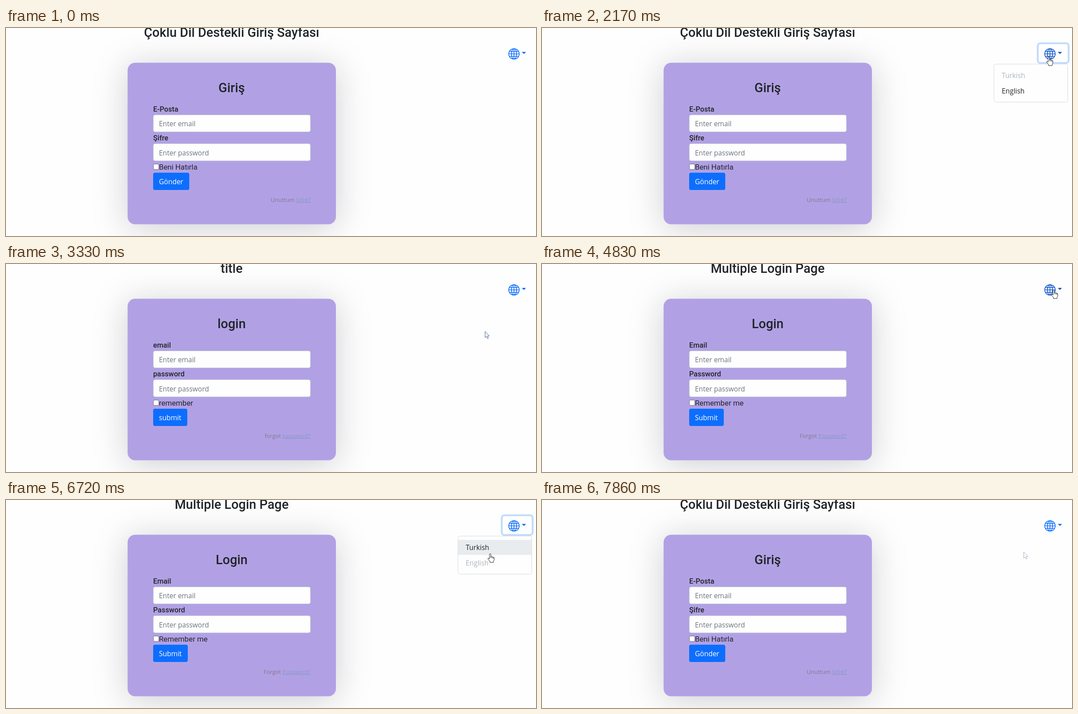
These frames come from a looping animation (1192x470 px, 8 s). An HTML page:

```html
<!DOCTYPE html>
<html lang="en">
<head>
<meta charset="utf-8">
<title>Login page with language menu</title>
<style>
  html, body { margin: 0; width: 100%; height: 100%; overflow: hidden; background: #fefefe; }
  svg { display: block; width: 100%; height: 100%; }
  text { font: 15.5px "Open Sans", "Noto Sans", sans-serif; fill: #212529; }
  .heading { font: 500 28.8px Roboto, sans-serif; text-anchor: middle; }
  .label { font: 500 16.2px Roboto, sans-serif; }
  .plain { font: 16.8px Roboto, sans-serif; }
  .hint { fill: #6c757d; }
  #forgot { font-size: 12.85px; text-anchor: end; fill: #857790; }
  #forgotLink { fill: #8b97c8; text-decoration: underline; }
  #card { filter: drop-shadow(0 8px 38px rgba(8, 11, 33, .2)); }
  .field { fill: #fefefe; stroke: #ced4da; }
</style>
</head>
<body>
<svg viewBox="0 0 1192 470">
  <rect id="card" x="273.5" y="78.5" width="468.5" height="365" rx="17" fill="#b1a1e4"/>
  <text id="title" class="heading" x="507.5" y="20"/>
  <text id="login" class="heading" x="507.5" y="144.5"/>
  <text id="email" class="label" x="331" y="189"/>
  <rect class="field" x="331.5" y="196.5" width="353" height="38" rx="4"/>
  <text class="hint" x="344" y="222">Enter email</text>
  <text id="password" class="label" x="331" y="254"/>
  <rect class="field" x="331.5" y="261.5" width="353" height="38.5" rx="4"/>
  <text class="hint" x="344" y="288">Enter password</text>
  <rect x="331.5" y="307.5" width="12" height="12" rx="2.5" fill="#fff" stroke="#767676"/>
  <text id="remember" class="plain" x="344" y="320"/>
  <rect id="button" x="331" y="327" height="39" rx="4" fill="#0d6efd"/>
  <text id="submit" x="344" y="352.5" style="fill:#fff"/>
  <text id="forgot" x="685" y="392.5"><tspan id="forgotText"/> <tspan id="forgotLink"/></text>

  <rect id="ring" x="1115" y="34.5" width="69.5" height="44.5" rx="6" fill="none" stroke="#c2dbfe" stroke-width="4.2"/>
  <g id="globe" stroke-width="1.6">
    <circle cx="1142.5" cy="58.5" r="11.8" fill="none"/>
    <ellipse cx="1142.5" cy="58.5" rx="5.8" ry="11.8" fill="none"/>
    <path d="M1142.5 46.7v23.6M1130.7 58.5h23.6M1132.5 53h20M1132.5 64h20"/>
    <path d="M1160 54h9.4l-4.7 4.7z" stroke="none"/>
  </g>
  <g id="menu">
    <rect x="1016.5" y="81.5" width="166" height="86" rx="4" fill="#fefefe" stroke="#d9dadb"/>
    <rect id="row0" x="1017" y="90" width="165" height="34"/>
    <rect id="row1" x="1017" y="124" width="165" height="34"/>
    <text id="item0" x="1034" y="113">Turkish</text>
    <text id="item1" x="1034" y="147.5">English</text>
  </g>
  <g id="cursor">
    <circle id="spot" r="12.5" fill="#ff0" opacity=".55"/>
    <path id="arrow" d="M.5 .5V14.5L3.6 11.5L5.9 16.5L8 15.5L5.8 10.7H10Z" fill="#fff" stroke="#44648f"/>
    <path id="hand" d="M-1.6 12V1.6Q-1.5 .4 0 .4T1.5 1.6V7Q4 5.800 4.300 7.600Q6.600 6.800 6.900 8.500Q9 8 9 10V14L7.300 17.500V20H-.5V18L-4.800 12.600Q-5.700 10.200 -3.700 10.200Z M1.5 7v3M4.300 7.600v3M6.900 8.500v3" fill="#fff" stroke="#222"/>
  </g>
</svg>
<script>
const LOOP = 8000;
const el = id => document.getElementById(id);

const fields = ["title", "login", "email", "password", "remember", "submit", "forgotText", "forgotLink"];
const texts = {
  tr: ["Çoklu Dil Destekli Giriş Sayfası", "Giriş", "E-Posta", "Şifre", "Beni Hatırla", "Gönder", "Unuttum", "Şifre?"],
  keys: ["title", "login", "email", "password", "remember", "submit", "forgot", "password?"],
  en: ["Multiple Login Page", "Login", "Email", "Password", "Remember me", "Submit", "Forgot", "Password?"]
};

// Pointer moves: first step, last step, number of steps, end x, end y
const moves = [
  [390, 600, 4, 1106, 318],
  [800, 1010, 4, 1121, 79],
  [1210, 1350, 3, 1128, 87],
  [1420, 1700, 5, 1140, 65],
  [2320, 2730, 6, 1077, 152],
  [3920, 4690, 11, 1150, 60],
  [4760, 4830, 2, 1151, 58],
  [6230, 6570, 6, 1090, 117],
  [6720, 6720, 1, 1089, 121],
  [6790, 6860, 2, 1086, 125],
  [6930, 7130, 3, 1083, 117]
];

const within = (t, from, to) => t >= from && t < to;
const show = (id, visible) => el(id).style.display = visible ? "" : "none";

function pointerAt(t) {
  let x = 1123, y = 510;
  for (const [start, end, steps, endX, endY] of moves) {
    if (t < start) break;
    const interval = steps > 1 ? (end - start) / (steps - 1) : 1;
    const p = Math.min(1, (Math.floor((t - start) / interval + 0.01) + 1) / steps);
    const eased = p * p * (3 - 2 * p);
    x += (endX - x) * eased;
    y += (endY - y) * eased;
  }
  return { x, y };
}

let shownLanguage;
function setLanguage(language) {
  if (language === shownLanguage) return;
  shownLanguage = language;
  fields.forEach((id, i) => el(id).textContent = texts[language][i]);
  el("button").setAttribute("width", el("submit").getComputedTextLength() + 26.5);
}

function draw(t) {
  const { x, y } = pointerAt(t);
  const open = within(t, 2170, 3130) || within(t, 5630, 7660);
  const pressed = within(t, 3060, 3130) || within(t, 7590, 7660);
  const clicked = within(t, 3060, 3330) || within(t, 7590, 7730);
  const fading = within(t, 3130, 3330) || within(t, 5630, 5700) || within(t, 7660, 7730);
  const language = t < 3330 || t >= 7860 ? "tr" : t < 3460 || t >= 7730 ? "keys" : "en";
  setLanguage(language);

  const overButton = x > 1117 && x < 1183 && y > 37 && y < 78;
  const globeColor = overButton ? "#0b56c6" : "#0d6efd";
  el("globe").setAttribute("stroke", globeColor);
  el("globe").setAttribute("fill", globeColor);
  el("ring").style.opacity = fading ? 0.5 : open ? 1 : 0;

  show("menu", open);
  const current = t < 3330 ? 0 : 1;
  let overItem = false;
  for (const i of [0, 1]) {
    const top = 90 + 34 * i;
    const hover = open && i !== current && y >= top && y < top + 34;
    overItem ||= hover;
    el("row" + i).setAttribute("fill", !hover ? "none" : pressed ? "#0d6efd" : "#e9ecef");
    el("item" + i).style.fill = i === current ? "#adb5bd" : hover && pressed ? "#fff" : "#212529";
  }

  const hand = (overButton || overItem) && !pressed;
  el("cursor").setAttribute("transform", `translate(${Math.round(x)} ${Math.round(y)})`);
  show("spot", clicked);
  show("hand", hand);
  show("arrow", !hand);
  el("arrow").style.opacity = t >= 7730 ? 0.5 : 1;
}

function frame() {
  draw(performance.now() % LOOP);
  requestAnimationFrame(frame);
}
frame();
</script>
</body>
</html>
```
